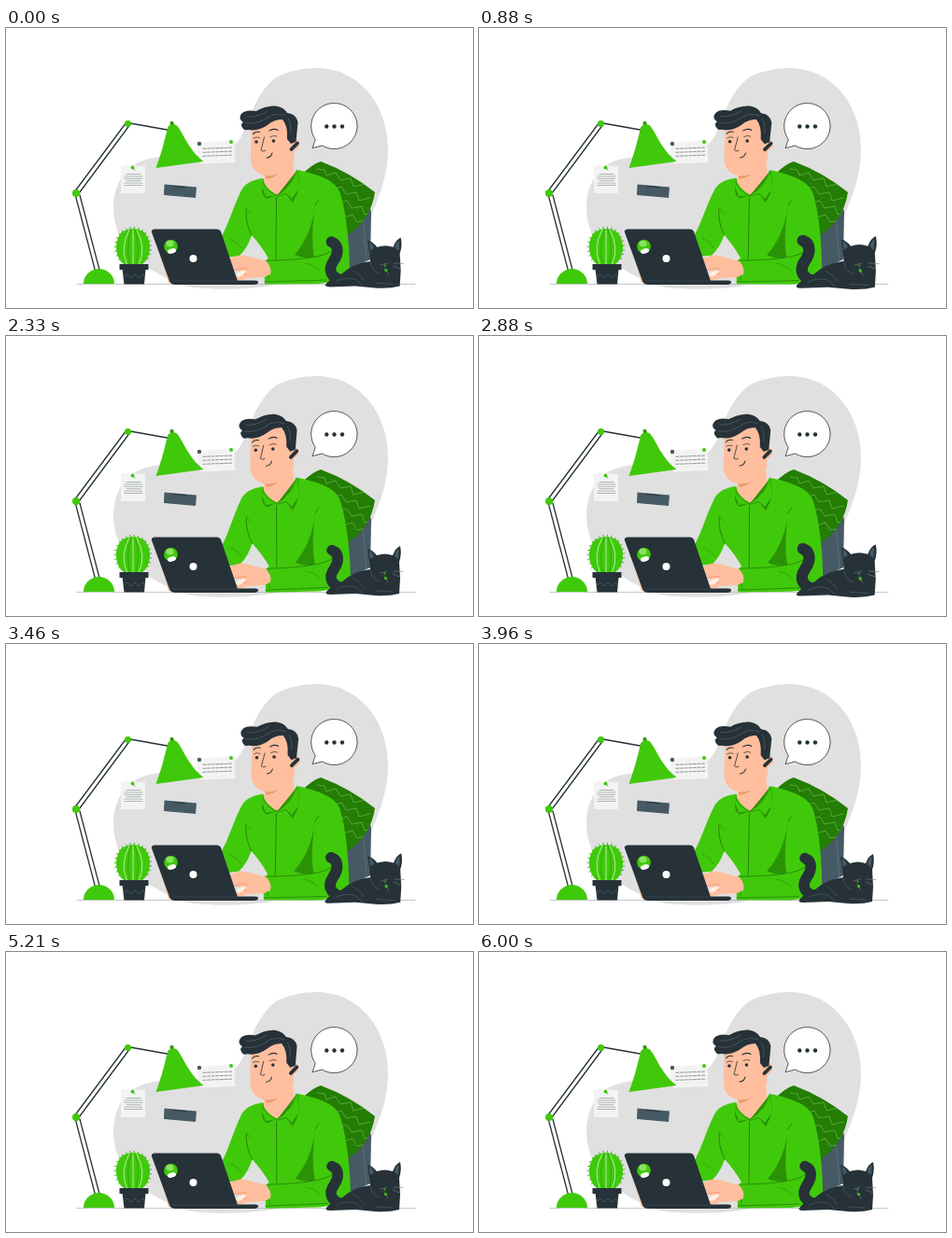
Write an HTML page with a canvas that moves like this. It is 500x300 px and loops after 6040 ms.

```html
<!DOCTYPE html>
<html lang="en">
<head>
<meta charset="utf-8">
<title>Desk scene</title>
<style>
html, body { margin: 0; width: 100%; height: 100%; overflow: hidden; background: #fff; }
canvas { display: block; width: 500px; height: 300px; }
</style>
</head>
<body>
<canvas id="stage" width="500" height="300"></canvas>
<script>
const ctx = document.getElementById('stage').getContext('2d');
const LOOP = 6040;
const GREEN = '#40c90a', SHADE = '#2b9206', SEAM = '#237407', DARK = '#263238', SLATE = '#455a64';
const SKIN = '#ffbe9d', BLUSH = '#eb996e', GREY = '#e0e0e0', PAPER = '#f3f3f3';

function fill(d, color) {
  ctx.fillStyle = color;
  ctx.fill(new Path2D(d));
}

function line(d, color, width = 1) {
  ctx.strokeStyle = color;
  ctx.lineWidth = width;
  ctx.stroke(new Path2D(d));
}

function oval(x, y, rx, ry, color, turn = 0) {
  ctx.beginPath();
  ctx.ellipse(x, y, rx, ry, turn, 0, Math.PI * 2);
  ctx.fillStyle = color;
  ctx.fill();
}

const dot = (x, y, r, color) => oval(x, y, r, r, color);

function posed(x, y, turn, scale, draw) {
  ctx.save();
  ctx.translate(x, y);
  ctx.rotate(turn);
  ctx.scale(scale, scale);
  ctx.translate(-x, -y);
  draw();
  ctx.restore();
}

function backdrop() {
  fill('M333 43C376 43 409 80 409 130C409 158 400 180 388 208L372 250L290 275C255 281 218 281 195 277C150 262 116 237 115 193C115 178 119 164 130 152C147 135 180 137 212 136C236 135 247 129 256 108C264 87 271 67 289 53C302 46 318 43 333 43Z', GREY);
  line('M76 274.5H438', '#b5b9bb', 0.8);
}

function papers() {
  fill('M123 147L126 148L129 146.5L133 148L138 147L143 148L149 147.5L149 177L123 177Z', PAPER);
  for (let i = 0; i < 6; i++) {
    const inset = i % 3 ? 0 : 2;
    line(`M${127 + inset} ${156.5 + i * 2.4}H${146 - inset}`, '#7d868a', 0.6);
  }
  dot(135.5, 149.5, 1.9, GREEN);
  line('M136 150L138 152', SHADE, 0.8);

  fill('M204 123L242 120L245 122L244 126L245.5 130L244.5 135L245.5 144L208 145.5L206 136Z', PAPER);
  ctx.setLineDash([3, 1.6]);
  for (let i = 0; i < 3; i++) line(`M211 ${129.3 + i * 4}l31 -1.2`, '#626b70', 0.7);
  ctx.setLineDash([]);
  dot(207, 124, 2.2, SLATE);
  dot(241, 122, 2, GREEN);

  fill('M169.5 167.5L204 170.5L203 182L169 179Z', SLATE);
  line('M179 169.500L193 170.700', DARK, 1);
}

function lamp() {
  line('M74.500 180L95.500 260M79 179L100 259M74.500 174L127.500 103M78.500 176.500L132 104.500M130 101.500L175 109.500', DARK, 1.3);
  fill('M83 274A16.500 16 0 0 1 116 274Z', GREEN);
  dot(75, 177, 4, GREEN);
  dot(130.500, 102.500, 3.6, GREEN);
  fill('M175.500 100.500L179 100L180 104L176 105Z', SHADE);
  fill('M173.500 105.500Q178 102 182.500 104C190 112 194 129 211.500 143L160.500 150C168 130 170 118 173.500 105.500Z', GREEN);
}

function cactus() {
  const cx = 136, cy = 235;
  for (let i = 0; i < 20; i++) {
    const a = Math.PI * (0.8 + i / 19 * 1.4);
    const x = cx + Math.cos(a) * 17, y = cy + Math.sin(a) * 19;
    line(`M${x} ${y}l${Math.cos(a - 0.3) * 3} ${Math.sin(a - 0.3) * 3}`, SHADE, 0.8);
  }
  fill('M126 253C115 245 116 224 125 218Q136 212 147 218C156 225 157 245 146 253Z', GREEN);
  for (const bend of [-11, 0, 11]) {
    line(`M${cx + bend * 0.4} 217Q${cx + bend * 1.3} 235 ${cx + bend * 0.6} 253`, '#d3f5c5', 0.8);
  }
  for (const bend of [-6, 6]) {
    line(`M${cx + bend * 0.4} 217Q${cx + bend * 1.3} 235 ${cx + bend * 0.6} 253`, SHADE, 0.6);
  }
  fill('M124.500 258H149.500L148 274.500H126.500Z', DARK);
  fill('M121.500 253H152.500V259H121.500Z', DARK);
  line('M126 267l4 -3l4 4l4 -4l4 4l4 -4l2 2', '#4c6470', 0.7);
}

function chair() {
  fill('M362 215L386 193Q391 192 391 198L390 248L366 259Z', SLATE);
  line('M382 198L386 250', '#5f747e', 0.8);
  const cushion = 'M316 158Q327 146 337 143Q369 155 395 176Q390 207 365 222L340 205Z';
  fill(cushion, '#247d04');
  ctx.save();
  ctx.clip(new Path2D(cushion));
  for (let i = 0; i < 4; i++) {
    line(`M${333 + i * 6} ${151 + i * 15}l8 1l2 6l10 -3l5 8l11 -2l3 9l12 -3`, '#62b04b', 0.8);
  }
  ctx.restore();
}

function shirt() {
  fill('M275 161C262 163 255 167 251 176C244 190 239 208 231 223L234 246L250 244Q259 235 263 222Q274 234 281 247L276 250L277 274.500L333 274C352 273 367 268 368 258C368 232 364 194 357 175C351 162 333 157 313 152L290 178Z', GREEN);
  fill('M331 190Q327 222 309 243Q319 248 330 245Q326 225 331 190Z', SHADE);
  line('M331 190Q332 187 335 184M257 194Q256 208 263 222M289.500 182L289 247', SEAM, 0.8);
  line('M280 249Q306 249 326 246Q341 244 349 239M277 272Q316 271 343 270M280 251L281 270', SEAM, 0.7);
  line('M240 226Q247 229 252 236M320 252Q330 254 335 260M258 194l4 5', '#2d9209', 0.7);
}

function head() {
  fill('M277 155L307 144L310 163Q303 174 290 179Q280 173 276 165Z', SKIN);
  fill('M277 157Q287 158 296 149Q292 160 279 162Z', BLUSH);
  fill('M275 162L277 172Q283 178 290 179L279 183Q274 179 274 174Z', SHADE);
  fill('M275 162Q275 171 290 179L278 181L274 170Z', GREEN);
  fill('M312 152Q315 166 312 177L307 187L300 178L289 181Z', SHADE);
  fill('M311 151Q314 162 313 173L306 183L300 177L290 180Q306 169 311 151Z', GREEN);
  line('M275 165Q278 175 290 179Q305 171 311 154', SEAM, 0.6);

  fill('M263 102L298 92L310 119L308 142Q304 153 290 157Q280 160 273 157C263 153 262 145 262 137Z', SKIN);
  oval(309, 125, 5, 6, SKIN, 0.2);
  fill('M254 108Q250 103 254 101Q248 97 252 92Q256 87 268 89C279 83 294 80 301 91Q311 92 312.500 101L310.500 122L305 124L301 119Q302 105 296 98Q287 98 280 104Q270 111 259 109Q255 110 254 108Z', DARK);
  line('M257 102Q270 104 283 94Q292 91 299 94M258 95Q269 96 280 89M302 97Q306 102 305 113', '#5c6a71', 0.6);

  dot(268, 122, 1.8, DARK);
  dot(286.500, 121, 1.8, DARK);
  line('M264.500 113.500Q267.500 110.500 271.500 111.500M282 110Q287 107 291 109.500', DARK, 1.1);
  line('M265 118Q268 116 271.500 117.500M283 116.500Q287 114.500 290 116', DARK, 0.7);
  line('M276.500 117L273 131Q275 133 277.500 131.500', DARK, 0.8);
  line('M279 139Q283.500 139 285 134', DARK, 1);
  line('M305.500 130L312 123.500', DARK, 3.8);
}

function hands() {
  fill('M239 248Q249 242 257 244L279 250Q285 257 283 264L276 267L259 268Q249 272 243 269L252 262L245 259L238 256Z', SKIN);
  line('M244 260Q252 256 258 258M250 263L257 264', BLUSH, 0.8);
  fill('M246 264Q252 259 257 260Q256 264 249 267Z', '#fff0e7');
}

function laptop() {
  fill('M159 222L163 224L180 274L174 273Z', SKIN);
  fill('M159 215.500H226Q229 215.500 230 218L248 271L248 274.500H178Q176 274 175 271L156 219Q155 216 159 215.500Z', DARK);
  fill('M176 270.500H267Q271 271 270 273Q269 275 266 275H180Z', DARK);
  line('M178 271H247', '#3c4c54', 0.6);
  dot(176.500, 234, 7.3, GREEN);
  oval(175.500, 231, 4, 3.2, '#8be268');
  oval(177.500, 239, 4.6, 2.7, '#fff', -0.25);
  dot(200.500, 247, 4, '#fff');
}

function cat() {
  line('M349 229.500C358 233 356 243 351 250C345 259 348 267 360 270', DARK, 11.5);
  fill('M343 274Q349 267 360 263Q372 252 390 250L389 241L387 228Q392 229 397 235Q406 232 414 235Q417 227 422 225Q424 233 421 242L422 260L421 276Q410 279 395 278L374 276L347 277Q341 277 343 274Z', DARK);
  fill('M388.500 230Q392 231 394 236L390 239Z', SLATE);
  fill('M420.500 228Q416 231 416 236L420 239Z', SLATE);
  line('M354 271Q364 266 374 269L381 275M372 260Q379 263 383 270M390 251Q391 260 399 263M396 273L414 274', '#4b5e68', 0.7);
  line('M401 254L408 252M405 257L409 264M415 252L425 252.500M414 255L422 258', '#74838a', 0.6);
  dot(406.500, 259.500, 1.6, GREEN);
  dot(405.500, 254.500, 0.9, GREEN);
}

function bubble() {
  const d = 'M331 119A24.700 24.500 0 1 1 338.500 126L328.500 128.500Z';
  fill(d, '#fff');
  line(d, DARK, 0.8);
  for (const x of [343.3, 351.5, 360]) dot(x, 105.5, 2.2, DARK);
}

// Smooth swell: 1 at the centre, 0 beyond the half width
function swell(t, centre, half) {
  const u = Math.abs(t - centre) / half;
  return u < 1 ? Math.cos(u * Math.PI / 2) ** 2 : 0;
}

function draw(t) {
  ctx.fillStyle = '#fff';
  ctx.fillRect(0, 0, 500, 300);
  ctx.lineCap = 'round';
  ctx.lineJoin = 'round';

  const lean = Math.sin(t / LOOP * Math.PI * 4) * 0.012;
  const breath = swell(t, 640, 900) + swell(t, 3080, 640);

  backdrop();
  papers();
  lamp();
  cactus();
  chair();
  posed(290, 178, lean, 1, () => { shirt(); head(); });
  posed(270, 258, lean * 0.6, 1, hands);
  laptop();
  posed(381, 253, 0, 1 + breath * 0.085, cat);
  bubble();
}

const start = performance.now();
function tick() {
  draw((performance.now() - start) % LOOP);
  requestAnimationFrame(tick);
}
tick();
</script>
</body>
</html>
```
